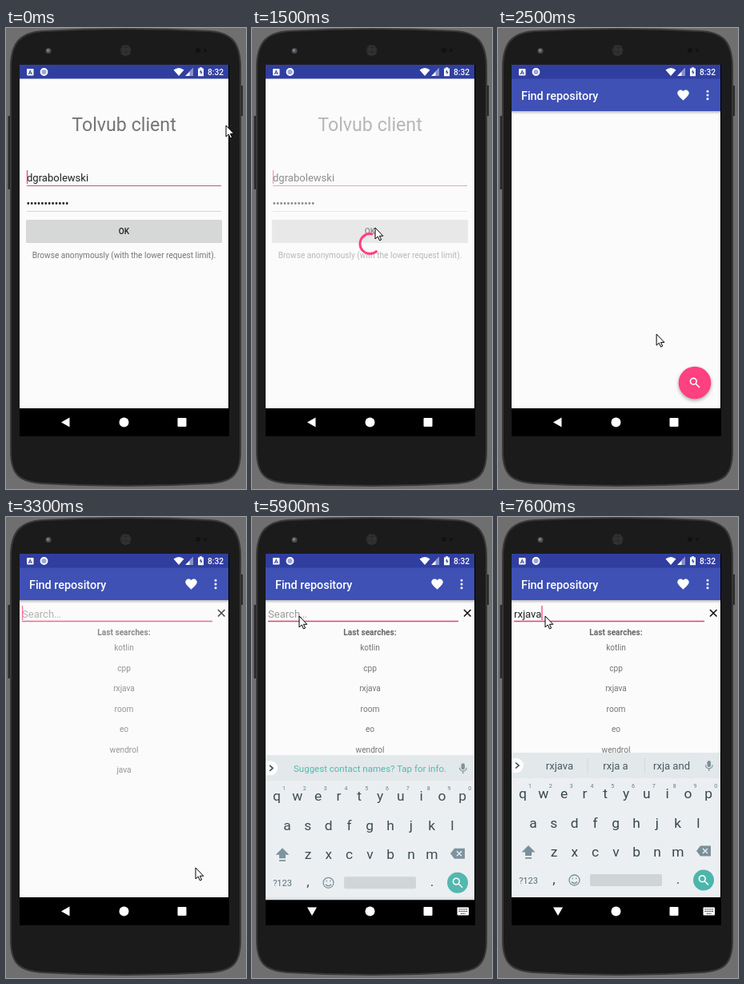
Recreate the animation shown at these times as an HTML page. Size 300 by 577 pixels, loop 8000 ms.

```html
<!DOCTYPE html>
<html lang="en">
<head>
<meta charset="utf-8">
<title>Repository search</title>
<style>
  html, body { margin: 0; width: 100%; height: 100%; overflow: hidden; background: #6f6f6f; }
  svg { display: block; width: 100vw; height: 100vh; }
  text { font: 10.15px Roboto, sans-serif; fill: #757575; white-space: pre; }
  .mid { text-anchor: middle; }
  .field { font-size: 13.05px; fill: #212121; }
  .bar { font-size: 14.4px; font-weight: 500; fill: #fff; }
  .key { font-size: 17.4px; fill: #37474f; }
  .digit { font-size: 7px; fill: #607d8b; }
  .word { font-size: 13.05px; fill: #455a64; }
</style>
</head>
<body>
<svg viewBox="0 0 300 577">
  <defs>
    <clipPath id="screen"><rect x="17" y="46" width="261" height="465"/></clipPath>
    <clipPath id="buttonClip"><rect x="25" y="240" width="245" height="28" rx="1.5"/></clipPath>
    <linearGradient id="shade" x2="0" y2="1">
      <stop stop-opacity=".25"/><stop offset="1" stop-opacity="0"/>
    </linearGradient>
    <pattern id="mesh" width="2.4" height="2.4" patternUnits="userSpaceOnUse">
      <circle cx="1.2" cy="1.2" r=".8" fill="#555"/>
    </pattern>
    <g id="lens" fill="none" stroke="#fff" stroke-width="1.6">
      <circle cx="-1.7" cy="-1.7" r="3.9"/><path d="M1.2 1.2 6 6"/>
    </g>
  </defs>

  <!-- phone -->
  <path d="M2.5 110h4v92h-4zM292 72h4v38h-4z" fill="#2a2a2a"/>
  <path d="M6 50C6 18 18 6 45 4Q150-2 255 4C282 6 293 18 293 50V530C293 560 282 568 255 570Q150 576 45 570C18 568 6 560 6 530Z"
        fill="#1b1b1b" stroke="#383838" stroke-width="2"/>
  <circle cx="53" cy="28.500" r="3.500" fill="#4a4d52"/><circle cx="52.500" cy="28" r="1.500" fill="#888d94"/>
  <circle cx="149.500" cy="28" r="7" fill="url(#mesh)"/>
  <circle cx="240" cy="28" r="3" fill="#121212"/><circle cx="249" cy="28" r="2" fill="#121212"/>
  <path d="M17 46h262v465H17z"/>

  <g clip-path="url(#screen)">
    <path d="M17 46h261v430H17z" fill="#fbfbfb"/>
    <g id="login">
      <text class="mid" x="147.500" y="129" style="font-size:23.2px">Tolvub client</text>
      <text class="field" x="26" y="192">dgrabolewski</text>
      <path id="userLine" d="M26 197.500H269"/>
      <path d="M27.800 219.500H77" stroke="#212121" stroke-width="2.900" stroke-linecap="round" stroke-dasharray="0 4.400"/>
      <path d="M26 229.500H269" stroke="#d4d4d4"/>
      <rect x="25" y="241" width="245" height="28" rx="1.500" opacity=".16"/>
      <rect x="25" y="240" width="245" height="28" rx="1.500" fill="#d6d7d7"/>
      <circle id="ripple" cx="154" cy="252" clip-path="url(#buttonClip)"/>
      <text class="mid" x="147.500" y="257.600" style="font-weight:500;fill:#212121">OK</text>
      <text class="mid" x="147.500" y="288">Browse anonymously (with the lower request limit).</text>
    </g>
    <path id="userCaret" d="M26.500 178V195" stroke="#ff4081" stroke-width="1.300"/>
    <circle id="spinner" r="12.500" fill="none" stroke="#ff4081" stroke-width="3" pathLength="360"/>

    <g id="home">
      <path d="M17 46h261v430H17z" fill="#fbfbfb"/>
      <path d="M17 46h261v18H17z" fill="#303f9f"/>
      <path d="M17 63h261v41H17z" fill="#3f51b5"/>
      <path d="M17 104h261v4H17z" fill="url(#shade)"/>
      <text class="bar" x="29" y="89.500">Find repository</text>
      <path transform="translate(222.800 75.200) scale(.725)" fill="#fff"
            d="M12 21.350C5.400 15.360 2 12.280 2 8.500 2 5.420 4.420 3 7.500 3c1.740 0 3.410.810 4.500 2.090C13.090 3.810 14.760 3 16.500 3 19.580 3 22 5.420 22 8.500c0 3.780-3.400 6.860-10 12.850z"/>
      <path d="M262 79.300v11" stroke="#fff" stroke-width="3" stroke-linecap="round" stroke-dasharray="0 4.700"/>
      <g id="fab" style="filter:drop-shadow(0 2px 2px #0005)">
        <circle r="20.300" fill="#ff4081"/><use href="#lens"/>
      </g>
      <g id="search">
        <text id="query" class="field" x="20" y="126"></text>
        <path d="M20 130.500H258" stroke="#d9466f" stroke-width="1.300"/>
        <path d="M265 116l8.500 8.500m0-8.500-8.500 8.500" stroke="#111" stroke-width="1.600"/>
        <text class="mid" x="147.500" y="148" style="font-weight:700;fill:#666">Last searches:</text>
        <g id="recent"></g>
        <path id="caret" d="M0 111V129" stroke="#ff4081" stroke-width="1.300"/>
      </g>
    </g>
  </g>

  <!-- status bar -->
  <path d="M17 46h261v17.500H17z" fill="#303f9f"/>
  <rect x="26" y="51" width="8.500" height="8.500" rx="1" fill="#fff"/>
  <text class="mid" x="30.300" y="58" style="font-size:7.500px;font-weight:700;fill:#303f9f">A</text>
  <circle cx="47.500" cy="55" r="4" fill="#9fa8da" stroke="#fff" stroke-width="1.800"/>
  <path d="M209.500 52.500Q216 47.500 222.500 52.500L216 60ZM234 50V60H224Z" fill="#fff"/>
  <path d="M234 50V60H229.500V54.500Z" fill="#8790c8"/>
  <path d="M240 50.500h2v-1.300h3v1.300h2V60.300h-7z" fill="#fff"/>
  <path d="M244 52l-2.200 3.500h1.700v3l2.200-3.700H244z" fill="#303f9f"/>
  <text x="252" y="59" style="font-size:10.150px;font-weight:500;fill:#fff">8:32</text>

  <g id="keyboard" clip-path="url(#screen)">
    <path d="M17 295h261v181H17z" fill="#eceff1"/>
    <path d="M17 295h261v32H17z" fill="#e3e8ea"/>
    <path d="M17 302h6a9 9 0 0 1 0 18h-6z" fill="#fff"/>
    <path d="M22 307.500l4 3.500-4 3.500" fill="none" stroke="#37474f" stroke-width="1.600"/>
    <text id="tip" class="mid" x="147.500" y="315.500" style="font-size:11.500px;fill:#4db6ac">Suggest contact names? Tap for info.</text>
    <g id="words">
      <path d="M112 302v18M183.500 302v18" stroke="#cfd8dc"/>
      <text class="word mid" x="77" y="316"></text>
      <text class="word mid" x="147" y="316"></text>
      <text class="word mid" x="217" y="316"></text>
    </g>
    <rect x="261.500" y="305" width="4.500" height="8" rx="2.200" fill="#78909c"/>
    <path d="M259.500 310.500a4.300 4.300 0 0 0 8.600 0M263.800 315v3" fill="none" stroke="#78909c" stroke-width="1.200"/>
    <g id="keys"></g>
    <path d="M38 411l8.500 8.500H42V424H34v-4.500h-4.500zM34 426h8v1.700h-8z" fill="#78909c"/>
    <path d="M248 418l5-6.500h13v13h-13z" fill="#78909c"/>
    <path d="M256 415l6 6m0-6-6 6" stroke="#eceff1" stroke-width="1.400"/>
    <text class="mid" x="38" y="458.500" style="font-size:11px;fill:#546e7a">?123</text>
    <g fill="none" stroke="#78909c" stroke-width="1.300">
      <circle cx="95.500" cy="454.500" r="6.500"/><path d="M92 456.500q3.500 4 7 0M93.300 451.500v1.800M97.700 451.500v1.800"/>
    </g>
    <rect x="115" y="447" width="90" height="15" rx="2" fill="#cfd4d7"/>
    <circle cx="257" cy="454.500" r="13" fill="#4db6ac"/><use href="#lens" x="257" y="454.500"/>
  </g>

  <!-- navigation bar -->
  <g fill="#fff">
    <path id="back" d="M69 493.500l10.500-6v12z"/>
    <path id="down" d="M69 488.500h12l-6 10.500z"/>
    <circle cx="147.500" cy="493.500" r="6"/>
    <rect x="214.500" y="488" width="11" height="11" rx="1"/>
    <g id="imeIcon">
      <rect x="256.500" y="488.500" width="14.500" height="10" rx="1"/>
      <path d="M258.500 491h11M258.500 493.500h11M261 496.300h5.500" stroke="#000" stroke-dasharray="1.300 1"/>
    </g>
  </g>
  <path id="pointer" d="M0 0V14L3.200 11 5.500 16 7.600 15 5.400 10.300H9.800Z" fill="#fff" stroke="#000"/>
</svg>
<script>
const LOOP = 8000;
const el = Object.fromEntries([...document.querySelectorAll('[id]')].map(e => [e.id, e]));
const ramp = (t, from, to) => Math.min(1, Math.max(0, (t - from) / (to - from)));
const decel = (p, power) => 1 - (1 - p) ** power;
const latest = (list, t) => list.filter(item => item[0] <= t).pop();
const show = (e, on) => e.style.display = on ? '' : 'none';
const set = (e, attrs) => { for (const k in attrs) e.setAttribute(k, attrs[k]); };
const label = (cls, x, y, s) => `<text class="${cls}" x="${x}" y="${y}">${s}</text>`;

el.recent.innerHTML = ['kotlin', 'cpp', 'rxjava', 'room', 'eo', 'wendrol', 'java']
  .map((s, i) => label('mid', 147.5, 167 + 25.5 * i, s)).join('');

const row = (chars, x, y) => [...chars].map((c, i) => label('key mid', x + 25.8 * i, y, c)).join('');
el.keys.innerHTML = row('qwertyuiop', 31, 352) + row('asdfghjkl', 44, 388.5) + row('zxcvbnm', 70, 425)
  + row(',', 70, 459) + row('.', 225, 459)
  + [...'1234567890'].map((c, i) => label('digit mid', 40 + 25.8 * i, 339, c)).join('');

// time, x, y
const pointerPath = [
  [100, 275, 122], [600, 154, 250], [2100, 154, 250], [2500, 198, 383], [2850, 237, 439],
  [4850, 237, 439], [5300, 9, 150], [5500, 59, 124], [LOOP, 59, 124]
];
const typing = [[0, ''], [6700, 'r'], [7000, 'rx'], [7200, 'rxj'], [7300, 'rxja'], [7500, 'rxjav'], [7600, 'rxjava']];
const suggestions = [
  [7200, 'rxj', 'rx j', 'rx just'], [7300, 'rxja', 'rx ja', 'rx jan'],
  [7500, 'rxjav', 'rxja a', 'rxja and'], [7600, 'rxjava', 'rxja a', 'rxja and']
];

function pointerAt(t) {
  const i = Math.max(1, pointerPath.findIndex(p => p[0] > t));
  const [a, b] = [pointerPath[i - 1], pointerPath[i]];
  const p = ramp(t, a[0], b[0]);
  return [a[1] + (b[1] - a[1]) * p, a[2] + (b[2] - a[2]) * p];
}

function drawLogin(t) {
  const dim = ramp(t, 1000, 1300) - ramp(t, 1700, 1900);
  el.login.style.opacity = 1 - dim / 2;
  set(el.userLine, { stroke: t < 1700 ? '#b5607c' : '#555' });
  set(el.ripple, { r: 135 * decel(ramp(t, 780, 1150), 2), opacity: .13 * (1 - ramp(t, 1000, 1400)) });
  show(el.userCaret, t < 100 || Math.floor(t / 500) % 2);
  el.userCaret.style.opacity = 1 - dim / 2;

  const dt = t - 1050;
  show(el.spinner, dt > 0 && t < 1700);
  set(el.spinner, {
    'stroke-dasharray': `${270 * decel(ramp(dt, 0, 667), 2)} 360`,
    transform: `translate(147.5 270) rotate(${dt * .2295 - 58})`
  });
}

function drawHome(t) {
  show(el.home, t >= 1980);
  el.home.style.opacity = decel(ramp(t, 1980, 2180), 4);
  set(el.home, { transform: `translate(0 ${40 * (1 - ramp(t, 1980, 2330)) ** 5})` });
  set(el.fab, { transform: `translate(246 444) scale(${1 - ramp(t, 2950, 3200)})` });
  el.search.style.opacity = ramp(t, 3000, 3400);

  const typed = latest(typing, t)[1];
  el.query.textContent = typed || 'Search…';
  el.query.style.fill = typed ? '#212121' : '#9a9a9a';
  const end = typed ? el.query.getComputedTextLength() : 0;
  set(el.caret, { transform: `translate(${20.6 + end} 0)` });
  show(el.caret, typed || Math.floor((t - 200) / 500) % 2 === 0);
}

function drawKeyboard(t) {
  const open = t >= 5780;
  show(el.keyboard, open);
  el.keyboard.style.opacity = decel(ramp(t, 5780, 5930), 2);
  set(el.keyboard, { transform: `translate(0 ${90 * (1 - ramp(t, 5780, 6030)) ** 5})` });
  show(el.back, !open);
  show(el.down, open);
  show(el.imeIcon, open);

  const words = latest(suggestions, t);
  show(el.tip, !words);
  show(el.words, words);
  if (words) el.words.querySelectorAll('text').forEach((e, i) => e.textContent = words[i + 1]);
}

function frame(now) {
  const t = now % LOOP;
  drawLogin(t);
  drawHome(t);
  drawKeyboard(t);
  set(el.pointer, { transform: `translate(${pointerAt(t)})` });
  requestAnimationFrame(frame);
}
requestAnimationFrame(frame);
</script>
</body>
</html>
```
